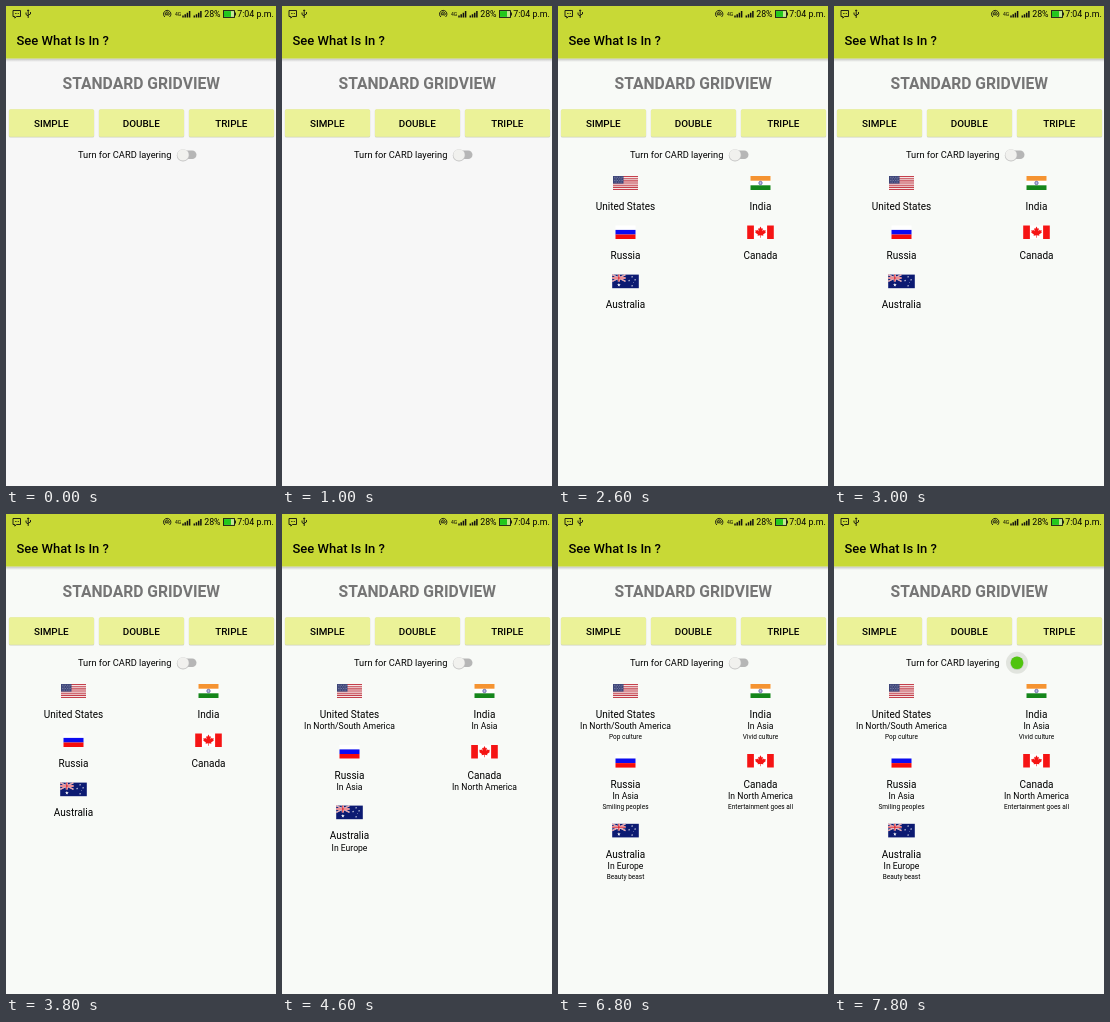
Recreate the animation shown at these times as an HTML page. Size 270x480 px, loop 8000 ms.

```html
<!DOCTYPE html>
<html>
<head>
<meta charset="utf-8">
<style>
html, body { margin: 0; height: 100%; overflow: hidden; background: #f8faf7; }
svg { display: block; width: 100vw; height: 100vh; }
text { font-family: Roboto, "Noto Sans", sans-serif; fill: #000; }
.mid { text-anchor: middle; }
</style>
</head>
<body>
<svg id="stage" viewBox="0 0 270 480">
  <defs>
    <linearGradient id="fade" x2="0" y2="1">
      <stop stop-color="#888" stop-opacity=".5"/><stop offset="1" stop-color="#999" stop-opacity="0"/>
    </linearGradient>
    <path id="star" d="M0-1 .25-.3 1-.3 .4 .15 .6 .9 0 .45-.6 .9-.4 .15-1-.3-.25-.3z" fill="#fff"/>

    <g id="us">
      <rect x="-12.5" y="-7" width="25" height="14" fill="#f4e4e4"/>
      <path d="M-12.5-6.5h25m-25 2.17h25m-25 2.17h25m-25 2.17h25m-25 2.17h25m-25 2.17h25m-25 2.17h25" stroke="#c4404c" stroke-width="1.08"/>
      <rect x="-12.5" y="-7" width="10.5" height="7.6" fill="#3c4478"/>
      <path d="M-11.5-5.7h9m-8.3 1.6h8m-8.7 1.6h9m-8.3 1.6h8" stroke="#c9cbe0" stroke-width=".6" stroke-dasharray=".6 1.1"/>
    </g>
    <g id="india">
      <rect x="-10" y="-7" width="20" height="14" fill="#fff"/>
      <rect x="-10" y="-7" width="20" height="4.7" fill="#f59331"/>
      <rect x="-10" y="2.3" width="20" height="4.7" fill="#15861b"/>
      <circle r="1.7" fill="#b9bbdd" stroke="#34348c" stroke-width=".6"/>
    </g>
    <g id="russia">
      <rect x="-10" y="-6.8" width="20" height="4.6" fill="#fff"/>
      <rect x="-10" y="-2.3" width="20" height="4.6" fill="#0c0cf0"/>
      <rect x="-10" y="2.3" width="20" height="4.5" fill="#f60c0c"/>
    </g>
    <g id="canada">
      <rect x="-13.3" y="-6.8" width="26.6" height="13.6" fill="#fff"/>
      <path d="M-13.3-6.8h6.7v13.6h-6.7zM6.6-6.8h6.7v13.6H6.6zM0-5.6 1.2-3.4 2.4-4 1.9-1 3.4-2.4 3.8-1.6 5.3-1.9 4.8-.3 5.4 .2 2.6 2.4 2.9 3.5 .3 3.1V5.5H-.3V3.1L-2.9 3.5-2.6 2.4-5.4 .2-4.8-.3-5.3-1.9-3.8-1.6-3.4-2.4-1.9-1-2.4-4-1.2-3.4z" fill="#f51414"/>
    </g>
    <g id="australia">
      <rect x="-13.3" y="-6.8" width="26.6" height="13.6" fill="#0c1a72"/>
      <path d="M-13.3-6.8 0 0M0-6.8-13.3 0" stroke="#fff" stroke-width="1.3"/>
      <path d="M-13.3-6.8 0 0M0-6.8-13.3 0" stroke="#d8202c" stroke-width=".5"/>
      <path d="M-6.65-6.8V0M-13.3-3.4H0" stroke="#fff" stroke-width="2.2"/>
      <path d="M-6.65-6.8V0M-13.3-3.4H0" stroke="#d8202c" stroke-width="1.2"/>
      <use href="#star" transform="translate(-6.6 3.5) scale(1.8)"/>
      <use href="#star" transform="translate(6.6 -4.5)"/>
      <use href="#star" transform="translate(3.6 -.8)"/>
      <use href="#star" transform="translate(9.6 -1.5)"/>
      <use href="#star" transform="translate(6.6 4.5)"/>
      <use href="#star" transform="translate(8 1) scale(.5)"/>
    </g>
  </defs>

  <rect id="back" width="270" height="480"/>
  <rect y="52.500" width="270" height="3.500" fill="url(#fade)"/>
  <rect width="270" height="52.500" fill="#c8d936"/>

  <g fill="none" stroke="#111" stroke-width=".9">
    <path d="M7 4.500h7.500v6h-4l-1.700 1.600v-1.600H7zM9 7.500h.8m.7 0h.8m.7 0h.8"/>
    <path d="M22.200 4v8M20 6.500v2l2.200 1.500M24.500 6v2l-2.300 1.200M21.300 5l.9-1.200.9 1.200"/>
    <path d="M158.900 11a3.700 3.700 0 1 1 4.600 0M159.900 9.500a2 2 0 1 1 2.600 0"/>
    <circle cx="161.200" cy="8.300" r=".7"/>
    <path d="M177 11.500v-2m2.200 2v-3.200m2.200 3.200v-4.800m2.200 4.800v-6.500M188.300 11.500v-2m2.200 2v-3.200m2.200 3.200v-4.800m2.200 4.800v-6.500" stroke-width="1.500"/>
    <rect x="217.500" y="4.600" width="11" height="6.800" fill="#c5e890"/>
    <path d="M229.500 6.500v3"/>
  </g>
  <rect x="218" y="5.100" width="7" height="5.800" fill="#22c81c"/>
  <g font-size="8.800">
    <text x="169" y="10" font-size="5">4G</text>
    <text x="198.200" y="11.200">28%</text>
    <text x="231.300" y="11.200">7:04 p.m.</text>
  </g>

  <text x="10.500" y="39" font-size="13" font-weight="500">See What Is In ?</text>
  <text class="mid" x="135.300" y="82.500" font-size="15.700" font-weight="700" style="fill:#757575">STANDARD GRIDVIEW</text>
  <g id="buttons"></g>
  <text x="72" y="152" font-size="9.300">Turn for CARD layering</text>

  <g id="off">
    <rect x="173" y="144.500" width="17.500" height="8.600" rx="4.300" fill="#b6b6b6"/>
    <circle cx="177" cy="149.400" r="6.200" fill="#c4c4c4"/>
    <circle cx="177" cy="148.900" r="5.700" fill="#f1f1ee"/>
  </g>
  <g id="on">
    <circle cx="183" cy="148.800" r="11" fill="#e1e4de"/>
    <circle cx="183" cy="149.300" r="6.700" fill="#b9cdb0"/>
    <circle cx="183" cy="148.700" r="6.300" fill="#50c40e"/>
  </g>
  <g id="lists"></g>
</svg>
<script>
const $ = id => document.getElementById(id);
const show = (el, on) => el.setAttribute('display', on ? 'inline' : 'none');
const label = (x, y, size, text) =>
  `<text class="mid" x="${x}" y="${y}" font-size="${size}">${text}</text>`;

const countries = [
  ['us', 'United States', 'In North/South America', 'Pop culture'],
  ['india', 'India', 'In Asia', 'Vivid culture'],
  ['russia', 'Russia', 'In Asia', 'Smiling peoples'],
  ['canada', 'Canada', 'In North America', 'Entertainment goes all'],
  ['australia', 'Australia', 'In Europe', 'Beauty beast']
];
const pitches = [49.2, 60.7, 69.8];
const lines = [[27, 10], [38.3, 8.6], [48.3, 6.5]]; // offset, font size
const taps = [1600, 4000, 5600];
const tapDelay = 200, tapHold = 400, switchTime = 7800, loop = 8000;

$('lists').innerHTML = pitches.map((pitch, level) => '<g>' + countries.map(([flag, ...texts], i) => {
  const x = 67.5 + 135 * (i % 2), y = 177 + pitch * (i >> 1);
  return `<use href="#${flag}" x="${x}" y="${y}"/>` +
    lines.slice(0, level + 1).map(([dy, size], k) => label(x, y + dy, size, texts[k])).join('');
}).join('') + '</g>').join('');

$('buttons').innerHTML = ['SIMPLE', 'DOUBLE', 'TRIPLE'].map((name, i) => {
  const x = 3 + 90 * i;
  return `<rect class="glow" x="${x - .8}" y="103" width="86.6" height="29.5" rx="2" fill="#8b8f78" opacity=".3"/>
    <rect x="${x - .2}" y="103.6" width="85.4" height="28" rx="1.5" fill="#d0d3c0"/>
    <rect x="${x}" y="103.3" width="85" height="27.5" rx="1.5" fill="#ebf298"/>
    <g font-weight="500">${label(x + 42.3, 120.6, 9.9, name)}</g>`;
}).join('');
const glows = [...document.querySelectorAll('.glow')];
const lists = [...$('lists').children];

function draw(t) {
  const level = taps.filter(tap => t >= tap + tapDelay).length - 1;
  lists.forEach((el, i) => show(el, i === level));
  glows.forEach((el, i) => show(el, t >= taps[i] && t < taps[i] + tapHold));
  show($('off'), t < switchTime);
  show($('on'), t >= switchTime);
  $('back').setAttribute('fill', level < 0 ? '#f7f7f7' : '#f8faf7');
}

const start = performance.now();
function tick() {
  draw((performance.now() - start) % loop);
  requestAnimationFrame(tick);
}
tick();
</script>
</body>
</html>
```
